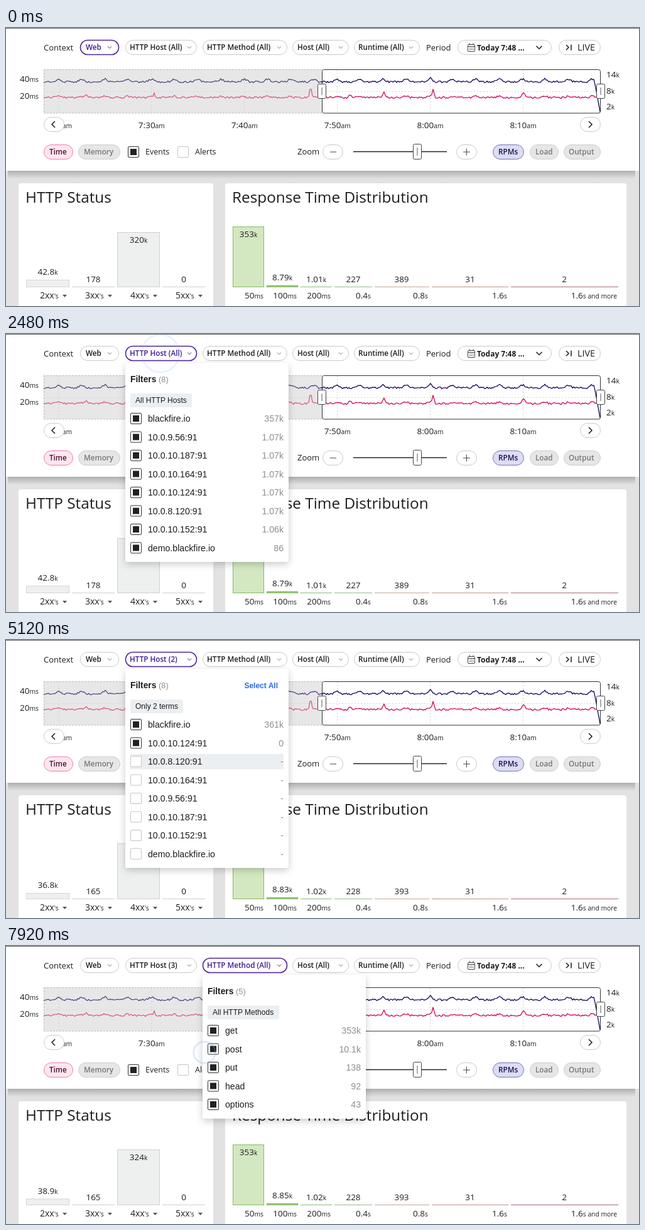
Write an HTML page that moves like this. It is 1008x444 px and loops after 8000 ms.

```html
<!DOCTYPE html>
<html lang="en">
<head>
<meta charset="utf-8">
<title>Monitoring dashboard</title>
<style>
  html, body { margin: 0; width: 100%; height: 100%; overflow: hidden; background: #e2e2e2; }
  svg { display: block; width: 1008px; height: 444px; font-family: "Open Sans", sans-serif; }
  .menu { font-family: "Liberation Sans", Arial, sans-serif; }
</style>
</head>
<body>
<svg id="stage" viewBox="0 0 1008 444">
  <defs>
    <linearGradient id="fade" x2="0" y2="1">
      <stop offset="0" stop-color="#aeb0b0"/>
      <stop offset="1" stop-color="#e2e2e2"/>
    </linearGradient>
    <filter id="shadow" x="-20%" y="-20%" width="140%" height="140%">
      <feDropShadow dx="0" dy="4" stdDeviation="6" flood-color="#000" flood-opacity=".2"/>
    </filter>
  </defs>
  <g id="base"></g>
  <g id="live"></g>
  <rect id="loader" x="0" y="224" height="3.5" fill="#17a0b9"/>
  <g id="menu" class="menu"></g>
  <circle id="ring" fill="#8fb4f5" fill-opacity=".08" stroke="#78a2ea" stroke-width="2.5"/>
</svg>
<script>
const LOOP = 8000;
const INK = '#1d1d1d', GREY = '#c9c9c9', VIOLET = '#3f1a94', MUTED = '#8d8d98';
const $ = id => document.getElementById(id);

const rect = (x, y, w, h, fill, stroke = 'none', rx = 0, extra = '') =>
  `<rect x="${x}" y="${y}" width="${w}" height="${h}" rx="${rx}" fill="${fill}" stroke="${stroke}" ${extra}/>`;
const path = (d, stroke = INK, width = 1, extra = '') =>
  `<path d="${d}" fill="none" stroke="${stroke}" stroke-width="${width}" ${extra}/>`;
// A "|" in the string starts the smaller unit.
function text(x, y, s, { size = 13.5, weight = 400, fill = INK, anchor = 'start' } = {}) {
  const [main, unit] = s.split('|');
  const tail = unit ? `<tspan font-size="10.3">${unit}</tspan>` : '';
  return `<text x="${x}" y="${y}" font-size="${size}" font-weight="${weight}" fill="${fill}" text-anchor="${anchor}">${main}${tail}</text>`;
}
const chevron = (x, y, r, color, width = 1) =>
  path(`M${x - r} ${y - r / 2}l${r} ${r}l${r} ${-r}`, color, width);
const arrow = (x, y, dir) => path(`M${x - 2 * dir} ${y - 5}l${5 * dir} 5l${-5 * dir} 5`, INK, 1.5);
const pill = (x, y, w, h = 23, fill = '#fff', stroke = GREY, width = 1) =>
  rect(x + .5, y + .5, w - 1, h, fill, stroke, h / 2, `stroke-width="${width}"`);
const checkbox = (x, y, on) =>
  rect(x + .5, y - 8.5, 17, 17, '#fff', on ? '#333' : '#c4c4c4', 1.5) +
  (on ? rect(x + 4, y - 5, 10, 10, '#222') : '');
const grip = (x, y, h) =>
  rect(x + .5, y + .5, 13, h, '#fff', '#444', 2) + path(`M${x + 7} ${y + 6}v${h - 11}`, '#555');

// Chart lines: seeded jitter around a base level, plus bumps.
const noise = n => { const v = Math.sin(n * 127.1 + 11.7) * 43758.5453; return v - Math.floor(v); };
const bump = (x, at, height, width) => height * Math.exp(-(((x - at) / width) ** 2));
function rpm(x) {
  if (x > 937) return Math.min(135, 85 + (x - 937) * 5.4);
  const near = 84 + Math.round((x - 84) / 36.9) * 36.9;
  return 87.5 - noise(Math.floor(x / 2)) * 3 - bump(x, near, 4.5, 5) - bump(x, 677, 3, 3);
}
const SPIKES = [[485, 21, 1.3], [680, 12, 2.2], [236, 6, 2], [602, 6, 2], [825, 6, 3], [127, 4, 3], [548, 5, 2]];
function latency(x) {
  const near = 82 + Math.round((x - 82) / 37) * 37;
  return SPIKES.reduce((y, s) => y - bump(x, ...s),
    112.5 - noise(Math.floor(x / 2) + 900) * 3 - bump(x, near, 2, 4));
}
function trace(f, from, to, color, opacity) {
  let d = '';
  for (let x = from; x <= to; x += 2) d += `${d ? 'L' : 'M'}${x} ${f(x).toFixed(1)}`;
  return path(d, color, 1.35, `opacity="${opacity}" stroke-linejoin="round"`);
}

function drawBase() {
  const label = { size: 11.7, weight: 600 };
  let s = rect(0, 0, 1008, 444, '#e2e2e2') + rect(3, 228, 999, 13, 'url(#fade)') +
    rect(0, 0, 1008, 228, '#fff') + rect(0, 0, 1008, 1, '#666') +
    rect(20, 248, 310, 200, '#fff', 'none', 4) + rect(349, 248, 639, 200, '#fff', 'none', 4);

  s += text(60, 36, 'Context', { size: 13 }) + text(669, 36, 'Period', { size: 13 });
  s += pill(719, 19, 150) + text(750, 36, 'Today 7:48 ...', { size: 12, weight: 700 }) + chevron(849, 31, 4.5, INK, 1.5);
  s += rect(735.5, 26.5, 11, 11, 'none', '#444', 1.5) + path('M736 29.5h11M738.5 24v3M744 24v3', '#444') +
    path('M738 32h7M738 34.5h7', '#444', 1, 'stroke-dasharray="1.5 1"');
  s += pill(880, 19, 67) + path('M892 27l4 4l-4 4M900 26.5v9', INK, 1.5) + text(910, 36, 'LIVE', { size: 14.3 });

  s += rect(60, 66, 443, 70, '#e7e7e7');
  s += path('M60 66.5H503M60 136H503M60.5 66V136', '#bdbdbd', 1, 'stroke-dasharray="3 2"');
  s += path('M60 101.5H947', '#d2d2d2', 1, 'stroke-dasharray="2 3"');
  const ticks = ['7:20', '7:30', '7:40', '7:50', '8:00', '8:10'];
  ticks.forEach((tick, i) => {
    const x = 84 + i * 147.9;
    s += path(`M${x} 67V136`, '#cfcfcf', 1, 'stroke-dasharray="2 3"') +
      text(x, 160, tick + '|am', { anchor: 'middle' });
  });
  s += rect(503.5, 66.5, 443, 69.5, 'none', '#333', 3);
  s += trace(latency, 60, 502, '#d6095f', .62) + trace(rpm, 60, 502, '#1a0a66', .7) +
    trace(latency, 502, 947, '#d6095f', 1) + trace(rpm, 502, 947, '#1a0a66', 1);
  s += grip(496, 89, 23) + grip(940, 89, 23);
  s += text(52, 86, '40|ms', { anchor: 'end' }) + text(52, 113, '20|ms', { anchor: 'end' }) +
    text(956, 79, '14|k') + text(956, 105, '8|k') + text(956, 130, '2|k');
  s += pill(60, 142, 33) + arrow(76, 154, -1) + pill(914, 142, 33) + arrow(930, 154, 1);

  s += pill(60, 186, 47, 23, '#fde6ef', '#ee7fa8') + text(69, 202, 'Time', { ...label, fill: '#4a1029' });
  const off = { ...label, fill: '#777' };
  const soft = (x, w, name, tx) => pill(x, 186, w, 23, '#e6e6e6', '#cdcdcd') + text(tx, 202, name, off);
  s += soft(115, 67, 'Memory', 124) + soft(834, 46, 'Load', 843) + soft(888, 59, 'Output', 896);
  s += checkbox(194, 198, true) + text(222, 202, 'Events', { size: 12.5 }) +
    checkbox(273, 198, false) + text(301, 202, 'Alerts', { size: 12.5 });
  s += text(464, 202, 'Zoom', { size: 13 }) + pill(504, 186, 33) + path('M516 198h10', '#444') +
    path('M553 197.5H702', '#222', 1.5) + grip(648, 185, 24) +
    pill(717, 186, 33) + path('M728 198h11M733.5 192.5v11', '#444');
  s += pill(775, 186, 50, 23, '#dcdcf3', '#7474bd') + text(784, 202, 'RPMs', { ...label, fill: '#1d1350' });

  s += text(31, 279, 'HTTP Status', { size: 24.3 }) + text(360, 279, 'Response Time Distribution', { size: 24.3 });
  [2, 3, 4, 5].forEach((n, i) => {
    const x = 54 + i * 72;
    s += text(x, 432, n + "xx|'s", { size: 14 }) + `<path d="M${x + 36} 426h7l-3.5 4z" fill="#555"/>`;
  });
  [['50|ms', 410], ['100|ms', 463], ['200|ms', 517], ['0.4|s', 581], ['0.8|s', 672], ['1.6|s', 798], ['1.6|s and more', 973]]
    .forEach(([name, x]) => { s += text(x, 432, name, { anchor: 'end' }); });
  s += path('M105 413.5h68M249 413.5h68', '#d0d0d0') + path('M469 413.5h50', '#86bd7a') +
    path('M523 413.5h60', '#9bb795') + path('M587 413.5h87', '#c3a99a') +
    path('M678 413.5h122', '#bd938b') + path('M804 413.5h171', '#a8706f');
  s += rect(361.5, 317.5, 49, 96, '#d3e8c0', '#84bb66') + rect(415.5, 411.5, 49, 2, '#b5da9a', '#6fb04c');
  $('base').innerHTML = s;
}

const PILLS = [
  ['Web', 118, 62, 127, 165], ['HTTP Host', 190, 114, 197, 292], ['HTTP Method', 313, 135, 320, 435],
  ['Host (All)', 456, 90, 464, 533], ['Runtime (All)', 554, 105, 561, 645]
];
const DATA = [
  { counts: ['42.8|k', '178', '320|k'], tops: [402, 326], times: ['8.79|k', '1.01|k', '227', '389'] },
  { counts: ['36.8|k', '165', '324|k'], tops: [404, 324.5], times: ['8.83|k', '1.02|k', '228', '393'] },
  { counts: ['38.9|k', '165', '324|k'], tops: [403.5, 325], times: ['8.85|k', '1.02|k', '228', '393'] }
];

function drawLive({ data, hover, menu, terms }) {
  const mid = { anchor: 'middle' };
  let s = '';
  PILLS.forEach(([name, x, w, tx, cx], i) => {
    const lit = i === hover || i === menu;
    if (i === 1) name += ` (${terms || 'All'})`;
    if (i === 2) name += ' (All)';
    const stroke = i === menu ? '#4d2299' : i === hover ? '#b5a3da' : GREY;
    s += pill(x, 19, w, 23, '#fff', stroke, i === menu ? 1.6 : 1) +
      text(tx, 35, name, { size: 11.7, weight: 600, fill: lit ? VIOLET : INK }) +
      chevron(cx, 31, 3, lit ? VIOLET : '#777');
  });
  const { counts, tops, times } = DATA[data];
  s += rect(32.5, tops[0] + .5, 68, 413 - tops[0], '#eeefef', '#d5d5d5') +
    rect(177.5, tops[1] + .5, 67, 413 - tops[1], '#eeefef', '#d0d0d0');
  s += text(66.5, tops[0] - 8, counts[0], mid) + text(139, 406, counts[1], mid) +
    text(211, tops[1] + 17, counts[2], mid) + text(283, 406, '0', mid);
  s += text(386, 334, '353|k', mid) + text(440, 403, times[0], mid);
  [[494, times[1]], [553, times[2]], [630, times[3]], [739, '31'], [889, '2']]
    .forEach(([x, v]) => { s += text(x, 406, v, mid); });
  $('live').innerHTML = s;
}

const ip = tail => `10.0.${tail}:91`;
const ALL_HOSTS = [['blackfire.io', '357k'],
  ...['9.56', '10.187', '10.164', '10.124', '8.120'].map(n => [ip(n), '1.07k']),
  [ip('10.152'), '1.06k'], ['demo.blackfire.io', '86']];
const HOST_ORDER = ['blackfire.io', ...['10.124', '8.120', '10.164', '9.56', '10.187', '10.152'].map(ip), 'demo.blackfire.io'];
const METHODS = [['get', '353k'], ['post', '10.1k'], ['put', '138'], ['head', '92'], ['options', '43']];

function drawMenu({ menu, terms, row }) {
  if (!menu) { $('menu').innerHTML = ''; return; }
  const hosts = menu === 1, x = hosts ? 190 : 313, left = x + 8, right = x + 252;
  const rows = !hosts ? METHODS : !terms ? ALL_HOSTS :
    HOST_ORDER.map((name, i) => [name, i >= terms ? '-' : i ? '0' : '361k']);
  const filtered = hosts && terms > 0;
  const chip = filtered ? `Only ${terms} term${terms > 1 ? 's' : ''}` : hosts ? 'All HTTP Hosts' : 'All HTTP Methods';
  const chipWidth = filtered ? (terms > 1 ? 84 : 78) : hosts ? 98 : 114;
  const blue = { size: 12, weight: 700, fill: '#2a6bea' };

  let s = rect(x, 46, 260, 82 + rows.length * 29.5, '#fff', 'none', 3, 'filter="url(#shadow)"');
  s += text(left, 77, 'Filters', { size: 13.8, weight: 700 }) +
    text(left + 45, 77, `(${rows.length})`, { size: 12.8, fill: MUTED }) +
    rect(left, 95, chipWidth, 22, '#eceff2', 'none', 2) + text(left + 8, 110, chip, { size: 12 });
  if (filtered) s += text(433, 77, 'Select All', { ...blue, anchor: 'end' });
  rows.forEach(([name, count], i) => {
    const y = 135 + i * 29.5;
    if (i === row) s += rect(left, y - 12, 244, 24.5, '#eceff2');
    s += checkbox(left, y, !filtered || i < terms) + text(left + 28, y + 5, name, { size: 14.15 }) +
      text(right, y + 5, count, { size: 14.15, fill: MUTED, anchor: 'end' });
    if (i === row && !filtered) s += text(356, y + 5, 'Only', blue);
  });
  $('menu').innerHTML = s;
}

// Each step adds its changes to the state before it.
let state = { data: 0, hover: 0, menu: 0, terms: 0, row: -1 };
const STEPS = [
  [0, {}],
  [1040, { hover: 1 }],
  [2160, { menu: 1 }],
  [2880, { row: 0, hover: -1 }],
  [3360, { terms: 1 }],
  [4000, { data: 1 }],
  [4160, { row: 1 }],
  [4640, { terms: 2 }],
  [5040, { row: 2 }],
  [5280, { terms: 3 }],
  [5600, { row: -1, hover: 2 }],
  [6160, { menu: 2 }],
  [6240, { data: 2 }]
].map(([at, change]) => [at, state = { ...state, ...change }]);

const CLICKS = [ // time, x, y, strength
  [2080, 246, 31, 1], [3120, 359, 132, 1], [4480, 207, 164, 1],
  [5160, 207, 194, 1], [6080, 363, 30, 1], [7840, 316, 170, .25]
];
const LOADS = [[3400, 4000], [5680, 6240]];

let shown = null;
function render(t) {
  const current = STEPS.filter(([at]) => at <= t).pop()[1];
  if (current !== shown) {
    shown = current;
    drawLive(current);
    drawMenu(current);
  }
  const load = LOADS.find(([from, to]) => t >= from && t < to);
  $('loader').setAttribute('width', load ? (t - load[0]) * .65 : 0);

  const click = CLICKS.find(([at]) => t >= at && t < at + 450);
  const ring = $('ring');
  ring.setAttribute('opacity', 0);
  if (click) {
    const [at, x, y, strength] = click, p = (t - at) / 450;
    ring.setAttribute('cx', x);
    ring.setAttribute('cy', y);
    ring.setAttribute('r', 14 + 18 * p);
    ring.setAttribute('opacity', strength * Math.min(1, 1.45 * (1 - p)));
  }
}

drawBase();
const start = performance.now();
function tick() {
  render((performance.now() - start) % LOOP);
  requestAnimationFrame(tick);
}
tick();
</script>
</body>
</html>
```
